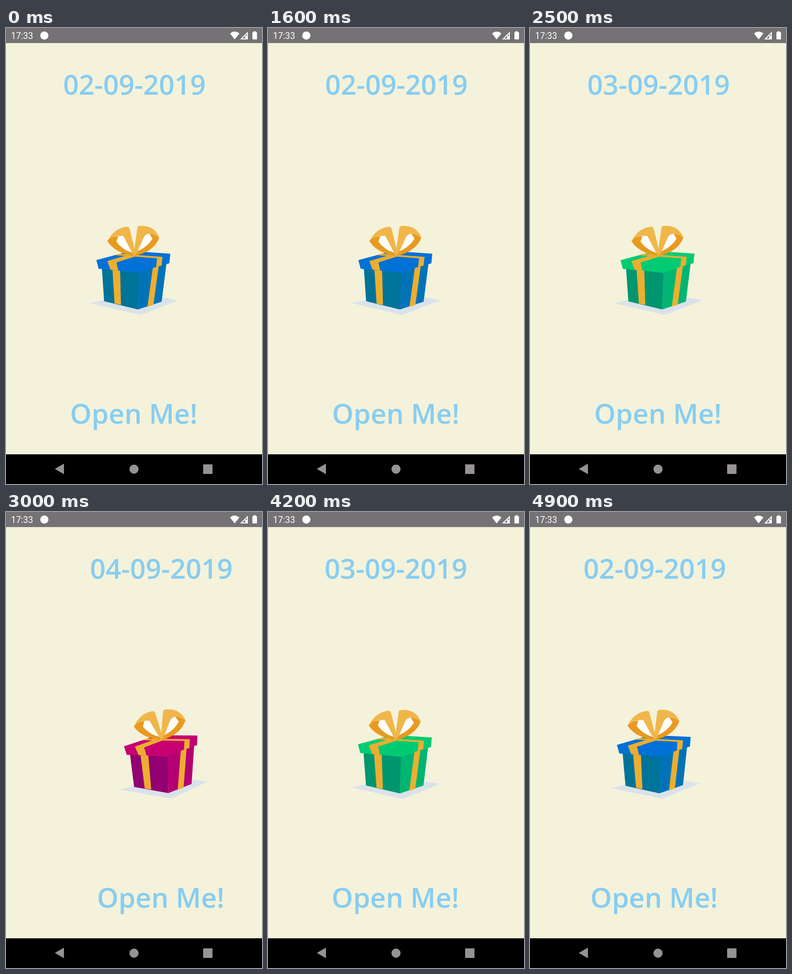
An HTML page for the animation above (5000 ms loop, 561 by 998 pixels).

```html
<!DOCTYPE html>
<html lang="en">
<head>
<meta charset="utf-8">
<title>Gift pager</title>
<style>
  html, body { margin: 0; width: 100%; height: 100%; overflow: hidden; background: #f4f2da; }
  svg { display: block; width: 561px; height: 998px; }
  .label { font: 600 60px "Open Sans", sans-serif; font-stretch: 80%; fill: #87cdf2; text-anchor: middle; }
  .clock { font: 19.4px Roboto, sans-serif; fill: #fff; }
</style>
</head>
<body>
<svg viewBox="0 0 561 998">
  <g id="pages"></g>
  <path fill="#757275" d="M0 0H561V33H0z"/>
  <text class="clock" x="11" y="24">17:33</text>
  <g fill="#fff">
    <circle cx="84" cy="16.5" r="9"/>
    <path d="M491 12Q501 3.5 511.500 12L501 25z"/>
    <path d="M530 8V25H513zM528 13L518 23H524V17H528z" fill-rule="evenodd"/>
    <path d="M542.500 9V7H547V9H549Q550 9 550 10V24Q550 25 549 25H541Q540 25 540 24V10Q540 9 541 9z"/>
  </g>
  <path d="M0 933H561V998H0z"/>
  <g fill="#969296">
    <path d="M107 965L127 953.500V976.500z"/>
    <circle cx="280.500" cy="965.500" r="10"/>
    <rect x="432" y="955" width="20.500" height="21" rx="1.500"/>
  </g>
</svg>
<script>
const LOOP = 5000, STEP = 100, WIDTH = 561;

const gifts = [
  { date: '02-09-2019', left: '#007399', right: '#0073b8', lid: '#0071d6' },
  { date: '03-09-2019', left: '#00966f', right: '#00b572', lid: '#00cb73' },
  { date: '04-09-2019', left: '#920071', right: '#b50073', lid: '#c70071' },
];

const swipes = [
  { start: 1700, from: 0, to: 1 },
  { start: 2750, from: 1, to: 2 },
  { start: 3552, from: 2, to: 1 },
  { start: 4452, from: 1, to: 0 },
];

const shape = (fill, d) => `<path fill="${fill}" d="${d}"/>`;

const bow =
  shape('#fffefa', 'M243 459L258 454L278 493Q254 484 242 468zM303 456L315 450L322 460Q310 478 287 490z') +
  shape('#e89a20', 'M222 466Q231 455 246 456L242 467Q252 483 277 493L280 499Q238 492 222 466z' +
    'M336 459Q326 451 314 450L321 461Q311 479 287 489L281 499Q324 490 336 459z') +
  shape('#f0b64a', 'M222 467Q237 437 266 435Q270 435 271 440L284 493L280 499L257 455Q233 453 222 467z' +
    'M288 437Q288 433 297 433Q326 433 336 459Q326 451 314 450Q307 451 303 456L286 494L279 499z');

const drawGift = ({ left, right, lid }) =>
  shape('#dae2ea', 'M183 602L295 628L377 596L290 580z') +
  shape(left, 'M210 524L293 530L289 616L215 598z') +
  shape(right, 'M292 530L352 513L341 599L289 616z') +
  shape('#ecae30', 'M233 526L250 528L252 606L238 603zM322 523L335 519L323 606L310 610z') +
  shape(lid, 'M198 508L273 488L360 494L358 515L329 523L291 536L247 531L203 527z') +
  shape('#ecae30', 'M222 510L270 496L290 498L242 513L246 531L229 529z' +
    'M237 497L250 494L343 501L341 520L329 523L331 504z') +
  bow;

const stage = document.getElementById('pages');
stage.innerHTML = gifts.map(gift => `<g>
  <text class="label" x="281.500" y="146">${gift.date}</text>
  <g>${drawGift(gift)}</g>
  <text class="label" x="280" y="866">Open Me!</text>
</g>`).join('');
const pages = [...stage.children];

// Finger drag, fling, then an exponential settle.
function swipeProgress(ms) {
  if (ms < 100) return 0.251 * (ms / 100) ** 2;
  if (ms < 200) return 0.251 + 0.576 * (ms - 100) / 100;
  return 1 - 0.173 * Math.exp((200 - ms) / 100);
}

function render(time) {
  const swipe = swipes.findLast(s => s.start <= time) || { start: -LOOP, from: 0, to: 0 };
  const elapsed = time - swipe.start;
  const position = swipe.from + (swipe.to - swipe.from) * swipeProgress(elapsed);
  const tilt = elapsed < 130 ? 0 : -6.35 * Math.exp((130 - elapsed) / 191);
  pages.forEach((page, i) => {
    page.setAttribute('transform', `translate(${(i - position) * WIDTH} 0)`);
    page.children[1].setAttribute('transform', `rotate(${i === swipe.to ? tilt : 0} 280.5 483)`);
  });
}

function tick() {
  render(Math.floor(performance.now() % LOOP / STEP) * STEP);
  requestAnimationFrame(tick);
}
tick();
</script>
</body>
</html>
```
